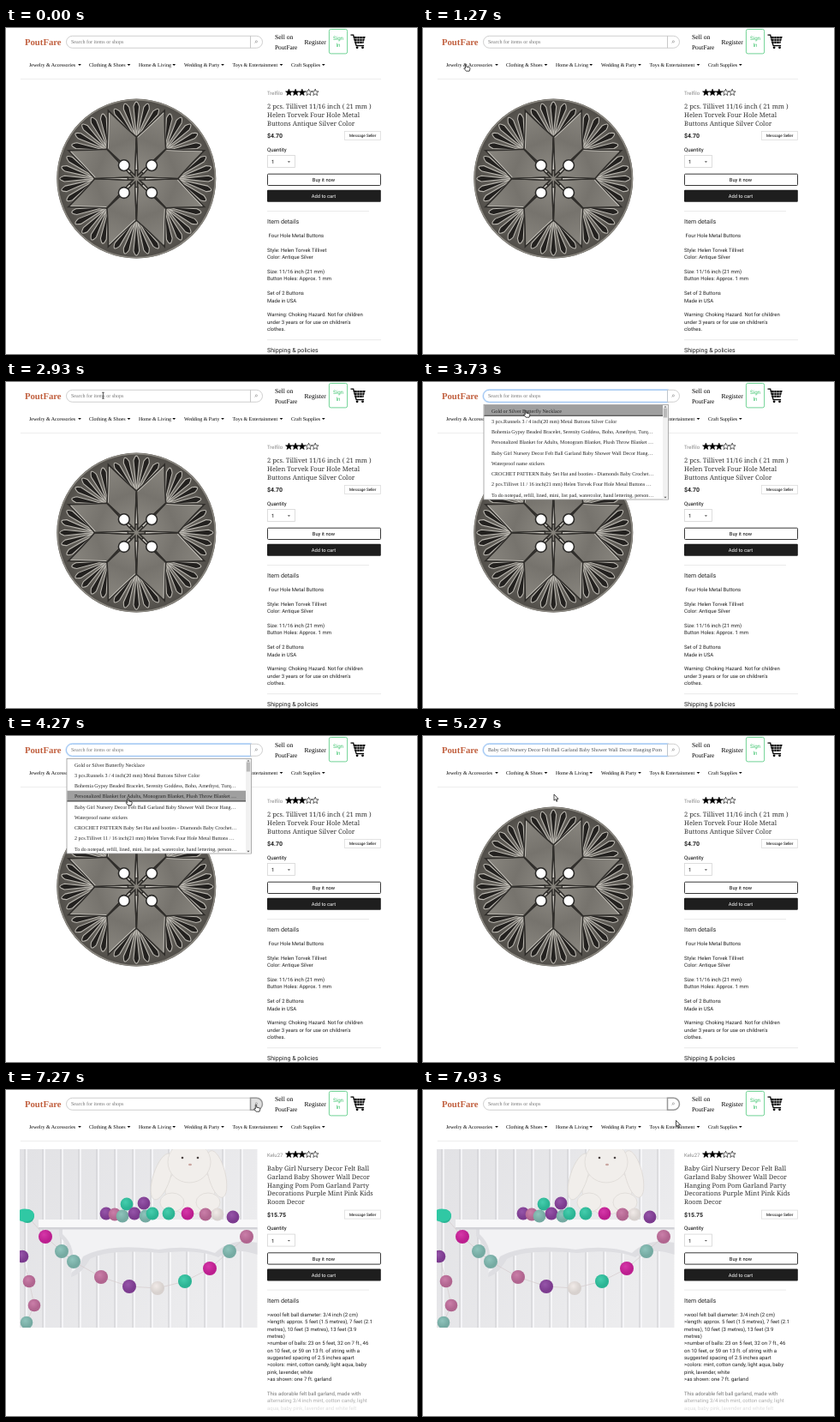
Animation, 480 px wide and 380 px high, one loop 8 s. Source, as an HTML page:

```html
<!DOCTYPE html>
<html lang="en">
<head>
<meta charset="utf-8">
<title>Shop search</title>
<style>
html, body { margin: 0; width: 100%; height: 100%; overflow: hidden; background: #fff; }
svg { display: block; width: 100%; height: 100%; }
text { white-space: pre; text-rendering: geometricPrecision; }
.serif { font-family: "Liberation Serif", serif; }
.sans { font-family: Roboto, sans-serif; }
.slab { font-family: "Noto Serif", serif; }
</style>
</head>
<body>
<svg id="stage" viewBox="0 0 480 380" xmlns="http://www.w3.org/2000/svg"></svg>
<script>
const LOOP = 8000, LAG = 70;
const LIST_OPEN = 2960, PICK = 4700, SUBMIT = 6670, DETAILS = 6900, PHOTO = 7270;
const BASE = 6.06;

const esc = s => s.replace(/&/g, '&amp;').replace(/</g, '&lt;').replace(/>/g, '&gt;');
// y is the middle of the capitals
const text = (x, y, s, size = BASE, font = 'serif', attrs = '') =>
  `<text x="${x}" y="${(y + size * .35).toFixed(2)}" font-size="${size}" class="${font}" ${attrs}>${esc(s)}</text>`;
const rect = (x, y, w, h, attrs) => `<rect x="${x}" y="${y}" width="${w}" height="${h}" ${attrs}/>`;
const path = (d, attrs = '') => `<path d="${d}" ${attrs}/>`;
const circle = (x, y, r, attrs) => `<circle cx="${x}" cy="${y}" r="${r}" ${attrs}/>`;
const ellipse = (x, y, rx, ry, attrs) => `<ellipse cx="${x}" cy="${y}" rx="${rx}" ry="${ry}" ${attrs}/>`;
const group = (id, body, attrs = '') => `<g id="${id}" ${attrs}>${body}</g>`;
const range = (n, f) => Array.from({ length: n }, (_, i) => f(i)).join('');
const MIDDLE = 'text-anchor="middle"';

const nav = [
  { label: 'Jewelry & Accessories', x: 27, caret: 86, menu: ['Necklaces', 'Bracelets', 'Rings', 'Earrings'] },
  { label: 'Clothing & Shoes', x: 97, caret: 143.5, menu: ["Women's", "Men's", "Kids' & Baby", 'Bags & Purses'] },
  { label: 'Home & Living', x: 155, caret: 196.2, menu: ['Home Decor', 'Bedding', 'Kitchen', 'Furniture'] },
  { label: 'Wedding & Party', x: 208, caret: 253, menu: ['Decorations', 'Gifts', 'Invitations', 'Clothing'] },
  { label: 'Toys & Entertainment', x: 264.5, caret: 321.5, menu: ['Toys', 'Books', 'Games', 'Music'] },
  { label: 'Craft Supplies', x: 333, caret: 370.8, menu: ['Beads', 'Fabric', 'Patterns', 'Yarn'] }
];

const suggestions = [
  'Gold or Silver Butterfly Necklace',
  '3 pcs.Runnels 3 / 4 inch(20 mm) Metal Buttons Silver Color',
  'Bohemia Gypsy Beaded Bracelet, Serenity Goddess, Boho, Amethyst, Turq…',
  'Personalized Blanket for Adults, Monogram Blanket, Plush Throw Blanket …',
  'Baby Girl Nursery Decor Felt Ball Garland Baby Shower Wall Decor Hang…',
  'Waterproof name stickers',
  'CROCHET PATTERN Baby Set Hat and booties - Diamonds Baby Crochet…',
  '2 pcs.Tillivet 11 / 16 inch(21 mm) Helen Torvek Four Hole Metal Buttons …',
  'To do notepad, refill, lined, mini, list pad, watercolor, hand lettering, person…'
];
const ROW = 12.25, LIST_TOP = 27;

const products = [{
  seller: 'Trelfilo', price: '$4.70',
  title: ['2 pcs. Tillivet 11/16 inch ( 21 mm )', 'Helen Torvek Four Hole Metal', 'Buttons Antique Silver Color'],
  about: [' Four Hole Metal Buttons', '', 'Style: Helen Torvek Tillivet', 'Color: Antique Silver', '',
    'Size: 11/16 inch (21 mm)', 'Button Holes: Approx. 1 mm', '', 'Set of 2 Buttons', 'Made in USA', '',
    'Warning: Choking Hazard. Not for children', "under 3 years or for use on children's", 'clothes.']
}, {
  seller: 'Kelu27', price: '$15.75',
  title: ['Baby Girl Nursery Decor Felt Ball', 'Garland Baby Shower Wall Decor', 'Hanging Pom Pom Garland Party',
    'Decorations Purple Mint Pink Kids', 'Room Decor'],
  about: ['>wool felt ball diameter: 3/4 inch (2 cm)', '>length: approx. 5 feet (1.5 metres), 7 feet (2.1',
    'metres), 10 feet (3 metres), 13 feet (3.9', 'metres)', '>number of balls: 23 on 5 feet, 32 on 7 ft., 46',
    'on 10 feet, or 59 on 13 ft. of string with a', 'suggested spacing of 2.5 inches apart',
    '>colors: mint, cotton candy, light aqua, baby', 'pink, lavender, white', '>as shown: one 7 ft. garland', '',
    'This adorable felt ball garland, made with', 'alternating 3/4 inch mint, cotton candy, light',
    'aqua, baby pink, lavender and white felt'],
  fade: [.62, .38, .15]
}];

function star(cx, cy, filled) {
  const points = Array.from({ length: 10 }, (_, i) => {
    const r = i % 2 ? 1.7 : 4.1, a = i * Math.PI / 5;
    return (cx + r * Math.sin(a)).toFixed(2) + ',' + (cy - r * Math.cos(a)).toFixed(2);
  });
  return `<polygon points="${points.join(' ')}" fill="${filled ? '#000' : '#fff'}" stroke="#000" stroke-width=".6"/>`;
}

function productDetails({ seller, price, title, about, fade }) {
  const dy = 9.8 * (title.length - 3);
  const lineFade = i => fade && i > 10 ? fade[i - 11] : 1;
  const lower =
    text(305, 126, price, 7, 'sans', 'font-weight="600" fill="#222"') +
    rect(395.5, 120.5, 42, 10, 'fill="#fff" stroke="#ddd" stroke-width=".8"') +
    text(416.7, 125.5, 'Message Seller', 4.6, 'sans', MIDDLE) +
    text(305, 141.5, 'Quantity', 6.1, 'sans') +
    rect(305.5, 148.5, 32, 14, 'fill="#fff" stroke="#d5d5d5" stroke-width=".8"') +
    text(310, 156, '1', 6, 'sans') + path('M328.8 155.3h3.2l-1.6 1.7z', 'fill="#555"') +
    rect(305.5, 170.2, 132, 13.3, 'rx="1" fill="#fff" stroke="#222" stroke-width=".9"') +
    text(371, 177, 'Buy it now', 5.75, 'sans', MIDDLE) +
    rect(305, 188.8, 132.8, 14, 'rx="1" fill="#1e1e1e"') +
    text(371, 196, 'Add to cart', 5.75, 'sans', MIDDLE + ' fill="#fff"') +
    path('M305 213.5H424' + (fade ? '' : 'M305 363.5H438'), 'stroke="#e2e2e2" stroke-width=".7"') +
    text(305, 226, 'Item details', 7.1, 'sans', 'fill="#222"') +
    about.map((s, i) => text(305, 242.2 + i * 8.36, s, 6, 'sans', `fill="#222" opacity="${lineFade(i)}"`)).join('') +
    text(305, 376, 'Shipping & policies', 7.1, 'sans', 'fill="#222"');
  return text(305, 75.5, seller, 6, 'sans', 'fill="#888"') +
    range(5, i => star(330.4 + i * 7.7, 75.2, i < 3)) +
    title.map((s, i) => text(305, 91.3 + i * 9.8, s, 7.55, 'slab', 'fill="#333"')).join('') +
    `<g transform="translate(0 ${dy})">${lower}</g>`;
}

function metalButton() {
  const turned = (angle, body) => `<g transform="rotate(${angle})">${body}</g>`;
  // grooves spread from the notch between two petals out to the rim
  const groove = (angle, width) => path(`M0-50L${width}-84Q0-95-${width}-84Z`,
    `transform="rotate(${angle} 0 -46)" fill="#23211f" stroke="#bab7b0" stroke-width="1.1"`);
  const fan = range(5, j => groove((j - 2) * 18, 3.4));
  const petal = path('M0-4L18.5-45Q10-62 0-86Q-10-62-18.5-45Z', 'fill="url(#petal)" stroke="#302e2b" stroke-width="1.6"') +
    path('M-17-45Q-9-62 0-83', 'fill="none" stroke="#c4c1ba" stroke-width=".9"');
  const ridge = path('M-1.6-10L0-47L1.6-10Z', 'fill="#d0cdc6" stroke="#302e2b" stroke-width="1.4"');
  const eightTimes = (body, offset = 0) => range(8, k => turned(k * 45 + offset, body));
  return '<g transform="translate(152.3 175.6)">' + circle(0, 0, 93, 'fill="url(#metal)"') +
    eightTimes(fan) + eightTimes(petal, 22.5) + eightTimes(ridge) +
    circle(0, 0, 92, 'fill="none" stroke="#8b8881" stroke-width="1.6"') +
    [[-14.5, -15.5], [17.8, -15.5], [-14.5, 16.4], [17.8, 16.4]]
      .map(([x, y]) => circle(x, y, 6.4, 'fill="#fff" stroke="#2a2927" stroke-width="1.6"')).join('') + '</g>';
}

const felt = { m: '#30c8a4', a: '#82bdb4', p: '#c4709f', g: '#d1219f', v: '#8a429f', w: '#efe8e5' };
const balls = (colors, points, r) => [...colors].map((c, i) =>
  circle(points[i][0], points[i][1], r, `fill="${felt[c]}"`) +
  circle(points[i][0], points[i][1], r, 'fill="url(#ballShade)"')).join('');

function garlandPhoto() {
  const hanging = [[25, 147], [46, 171], [65, 188], [79, 200], [111, 218], [144, 229], [177, 231], [209, 223], [238, 208], [261, 188], [281, 171]];
  const shelf = [[117, 144], [127, 145], [141, 133], [161, 132], [136, 147], [150, 144], [163, 147], [171, 144], [190, 144], [212, 144], [233, 145], [247, 145], [265, 148]];
  const side = [[19, 194], [27, 223], [33, 251], [24, 271]];
  const fur = 'fill="#f1eeeb" stroke="#dedad6" stroke-width=".8"';
  return '<g clip-path="url(#photoClip)">' +
    rect(16, 69, 278, 208, 'fill="url(#wall)"') +
    range(14, i => path(`M${22 + i * 21} 69v208`, 'stroke="#cfcfd3" stroke-width="1.1"') +
      path(`M${24 + i * 21} 69v208`, 'stroke="#f8f8fa" stroke-width="1.6"')) +
    path('M62 160H294V192Q265 182 248 195Q225 185 180 190Q120 185 98 197Q88 215 76 218Q82 190 62 170Z', 'fill="#dedee2"') +
    path('M66 160H294V178Q262 172 244 190Q215 180 178 186Q120 178 90 194Q84 209 76 213Q84 184 66 168Z', 'fill="#f2f2f4"') +
    rect(38, 151, 256, 10, 'fill="#f8f8f9"') + rect(38, 160, 256, 2.5, 'fill="#d2d2d7"') +
    ellipse(215, 118, 29, 27, fur) + ellipse(182, 101, 10, 28, fur + ' transform="rotate(18 182 101)"') +
    ellipse(246, 98, 10, 28, fur + ' transform="rotate(-14 246 98)"') + ellipse(214, 84, 25, 24, fur) +
    ellipse(194, 131, 14, 11, fur) + ellipse(236, 131, 14, 11, fur) +
    circle(206, 79, 1.3, 'fill="#4b4442"') + circle(224, 79, 1.3, 'fill="#4b4442"') + ellipse(215, 87, 2, 1.3, 'fill="#c9a6a0"') +
    path('M' + hanging.join('L') + 'M' + side.join('L'), 'fill="none" stroke="#d7cfd0" stroke-width=".8"') +
    balls('vpmvavammgpwv', shelf, 7.4) + balls('mgaapvwmgap', hanging, 8) + balls('vppa', side, 7.3) +
    ellipse(22, 146, 11, 7.5, `fill="${felt.m}"`) + '</g>';
}

const triangleRight = (x, y) => path(`M${x} ${y - 2}l2 2l-2 2z`);
const navBox = n => [n.x - 5, n.caret + 6.2];
function navHover(n, i) {
  const [left, right] = navBox(n);
  return group('nav' + i, rect(left, 37, right - left, 13.5, 'fill="#a8a8a8"') + path(`M${left} 50.5H${right}`, 'stroke="#222"'));
}
function navMenu(n, i) {
  const widths = { "Women's": 23.5, "Men's": 16.5, "Kids' & Baby": 35, 'Bags & Purses': 37.5 };
  return group('menu' + i, rect(n.x - 4.6, 52, 60, 60, 'rx="1" fill="#fff" stroke="#c8c8c8" stroke-width=".7"') +
    n.menu.map((s, j) => text(n.x, 62 + j * 13.6, s) +
      triangleRight(n.x + (widths[s] || s.length * 2.9), 62 + j * 13.6)).join(''));
}

const cart = '<g transform="translate(-.5 -.8)">' +
  path('M403 9h3.2l3.4 12.5h9', 'fill="none" stroke="#000" stroke-width="1.3"') +
  path('M406 10.8h14.2l-2.4 8h-9.6z') +
  path('M407 13.4h13M408 16.2h11M410.5 11v8M413.5 11v8M416.5 11v8', 'stroke="#fff" stroke-width=".6"') +
  circle(410.6, 23.6, 1.4, '') + circle(417, 23.6, 1.4, '') + '</g>';

const searchShape = 'M285.5 9.3H77.5a7 7 0 0 0 0 14H285.5z';
const buttonShape = 'M285.5 9.3h7a7 7 0 0 1 0 14H285.5z';
const header =
  text(22, 16.5, 'PoutFare', 10.7, 'serif', 'font-weight="bold" fill="#c1603f"') +
  path(searchShape, 'fill="#fff" stroke="#bbb" stroke-width=".7"') +
  group('ring', path(searchShape, 'fill="none" stroke="#cfe3fb" stroke-width="2.6"') +
    path(searchShape, 'fill="#fff" stroke="#80b4ee" stroke-width=".8"')) +
  group('placeholder', text(76, 16, 'Search for items or shops', BASE, 'serif', 'fill="#777"')) +
  group('query', text(76, 16, 'Baby Girl Nursery Decor Felt Ball Garland Baby Shower Wall Decor Hanging Pom', BASE, 'serif', 'fill="#495057"'), 'clip-path="url(#queryClip)"') +
  path(buttonShape, 'id="searchButton"') +
  circle(292.4, 15.8, 1.1, 'fill="none" stroke="#777" stroke-width=".5"') + path('M291.6 16.6l-1 1', 'stroke="#777" stroke-width=".5"') +
  text(314, 10.3, 'Sell on', 7.6) + text(314, 22, 'PoutFare', 7.3) + text(348.5, 16, 'Register', 7.6) +
  rect(377.4, 1.5, 21.2, 28.4, 'id="sign" rx="2" stroke="#4cc87a" stroke-width=".8"') +
  group('signText', text(388, 11.7, 'Sign', 6.2, 'sans', MIDDLE) + text(388, 20.2, 'In', 6.2, 'sans', MIDDLE)) +
  cart + nav.map(navHover).join('') +
  nav.map(n => text(n.x, 43.2, n.label, 5.95) + path(`M${n.caret - 1.9} 42h3.8l-1.9 2.1z`)).join('');

const list = rect(71, 26.5, 215.5, 110.5, 'fill="#fff" stroke="#999" stroke-width=".8"') +
  group('row', rect(71.4, 0, 208.6, ROW, 'fill="#9f9f9f"') + path(`M71.4 ${ROW}H280`, 'stroke="#222" stroke-width=".9"')) +
  suggestions.map((s, i) => text(80, 33.5 + i * ROW, s, BASE, 'serif', 'fill="#222"')).join('') +
  rect(280, 27, 6, 109.6, 'fill="#f1f1f1"') + rect(280.8, 30.5, 4.4, 11, 'fill="#b9b9b9"') +
  path('M281.5 29.6h3l-1.5-1.7zM281.5 133.8h3l-1.5 1.7z', 'fill="#555"');

const pointer = 'fill="#fff" stroke="#000" stroke-width=".7" stroke-linejoin="round"';
const cursor =
  group('arrow', path('M0 0V7.2L1.7 5.7L2.9 8.3L4 7.8L2.9 5.3H5.1z', pointer)) +
  group('hand', path('M-.7 .6Q0-.4 .7 .6V3.2L4.2 4Q5 4.3 4.8 5.4L4 8.2H.2L-2.4 5Q-2.2 4-.7 5z', pointer)) +
  group('beam', path('M-1.4-3.5h2.8M0-3.5v7M-1.4 3.5h2.8', 'stroke="#222" stroke-width=".7"'));

const stage = document.getElementById('stage');
stage.innerHTML = `<defs>
  <radialGradient id="metal"><stop offset=".3" stop-color="#85827b"/><stop offset="1" stop-color="#504d48"/></radialGradient>
  <linearGradient id="petal" x1="0" y1="1" x2="0" y2="0"><stop stop-color="#8f8c85"/><stop offset=".5" stop-color="#76736d"/><stop offset="1" stop-color="#8a8780"/></linearGradient>
  <linearGradient id="wall" x1="0" x2="1" y2=".5"><stop stop-color="#e2e2e5"/><stop offset="1" stop-color="#ececee"/></linearGradient>
  <radialGradient id="ballShade" cx=".4" cy=".35"><stop stop-color="#fff" stop-opacity=".1"/><stop offset="1" stop-opacity=".1"/></radialGradient>
  <clipPath id="photoClip">${rect(16, 69, 277.5, 208, '')}</clipPath>
  <clipPath id="queryClip">${rect(75, 9, 206, 15, '')}</clipPath>
</defs>` +
  rect(0, 0, 480, 380, 'fill="#fff"') +
  group('content', path('M17 59.5H438', 'stroke="#e9e9e9" stroke-width=".8"') +
    group('button', metalButton()) + group('photo', garlandPhoto()) +
    products.map((p, i) => group('product' + i, productDetails(p))).join('')) +
  header + nav.map(navMenu).join('') + group('list', list) + group('cursor', cursor);

const el = {};
stage.querySelectorAll('[id]').forEach(node => el[node.id] = node);
const show = (id, on) => el[id].setAttribute('display', on ? 'inline' : 'none');

// time, x, y of the pointer tip
const route = [[330, 392, -12], [480, 388, 10], [640, 384, 14], [1130, 46, 29], [1260, 50, 42], [1480, 76, 43],
  [1700, 112, 45], [1860, 110, 43], [2000, 107, 34], [2800, 112, 15], [3000, 114, 16], [3400, 118, 30],
  [3730, 120, 33], [4000, 125, 50], [4400, 148, 80], [4700, 150, 82], [5150, 153, 68], [5500, 153, 68],
  [5900, 262, 42], [6250, 292, 17], [7300, 292, 17], [7900, 295.5, 35.5]];

function pointerAt(t) {
  const next = route.findIndex(k => k[0] > t);
  if (next < 1) return (next ? route[route.length - 1] : route[0]).slice(1);
  const [a, b] = [route[next - 1], route[next]];
  const u = (t - a[0]) / (b[0] - a[0]), e = u * u * (3 - 2 * u);
  return [a[1] + (b[1] - a[1]) * e, a[2] + (b[2] - a[2]) * e];
}

function hoverAt(t, listOpen) {
  const [x, y] = pointerAt(t);
  const inside = (l, r, top, bottom) => x >= l && x < r && y >= top && y < bottom;
  return {
    row: listOpen && inside(71, 280, LIST_TOP, 137) ? Math.floor((y - LIST_TOP) / ROW) : -1,
    nav: listOpen ? -1 : nav.findIndex(n => inside(...navBox(n), 37, 51)),
    button: inside(285, 300, 9, 24),
    sign: inside(377, 399, 1, 31),
    field: inside(71, 285, 9, 24)
  };
}

function draw(t) {
  const listOpen = t >= LIST_OPEN && t < PICK;
  const over = hoverAt(t - LAG, listOpen), now = hoverAt(t, listOpen);
  const submitted = t >= SUBMIT, loaded = t >= DETAILS, filled = t >= PICK && !loaded;

  show('ring', t >= LIST_OPEN && !submitted);
  show('placeholder', !filled);
  show('query', filled);
  show('list', listOpen);
  show('row', over.row >= 0);
  el.row.setAttribute('transform', `translate(0 ${LIST_TOP + over.row * ROW})`);
  nav.forEach((_, i) => { show('nav' + i, over.nav === i); show('menu' + i, over.nav === i); });
  el.content.setAttribute('transform', `translate(0 ${over.nav >= 0 ? 1 : 0})`);

  el.searchButton.setAttribute('fill', over.button ? '#e0e0e0' : '#fff');
  el.searchButton.setAttribute('stroke', submitted ? '#999' : '#bbb');
  el.searchButton.setAttribute('stroke-width', submitted ? 1.5 : .7);
  el.sign.setAttribute('fill', over.sign ? '#28a745' : '#fff');
  el.signText.setAttribute('fill', over.sign ? '#fff' : '#3cc36c');

  show('product0', !loaded);
  show('product1', loaded);
  show('button', t < PHOTO);
  show('photo', t >= PHOTO);

  const hand = now.row >= 0 || now.nav >= 0 || now.button || now.sign;
  show('hand', hand);
  show('beam', !hand && now.field);
  show('arrow', !hand && !now.field);
  el.cursor.setAttribute('transform', `translate(${pointerAt(t).map(v => v.toFixed(2)).join(' ')})`);
}

const start = performance.now();
function tick() {
  draw((performance.now() - start) % LOOP);
  requestAnimationFrame(tick);
}
tick();
</script>
</body>
</html>
```
